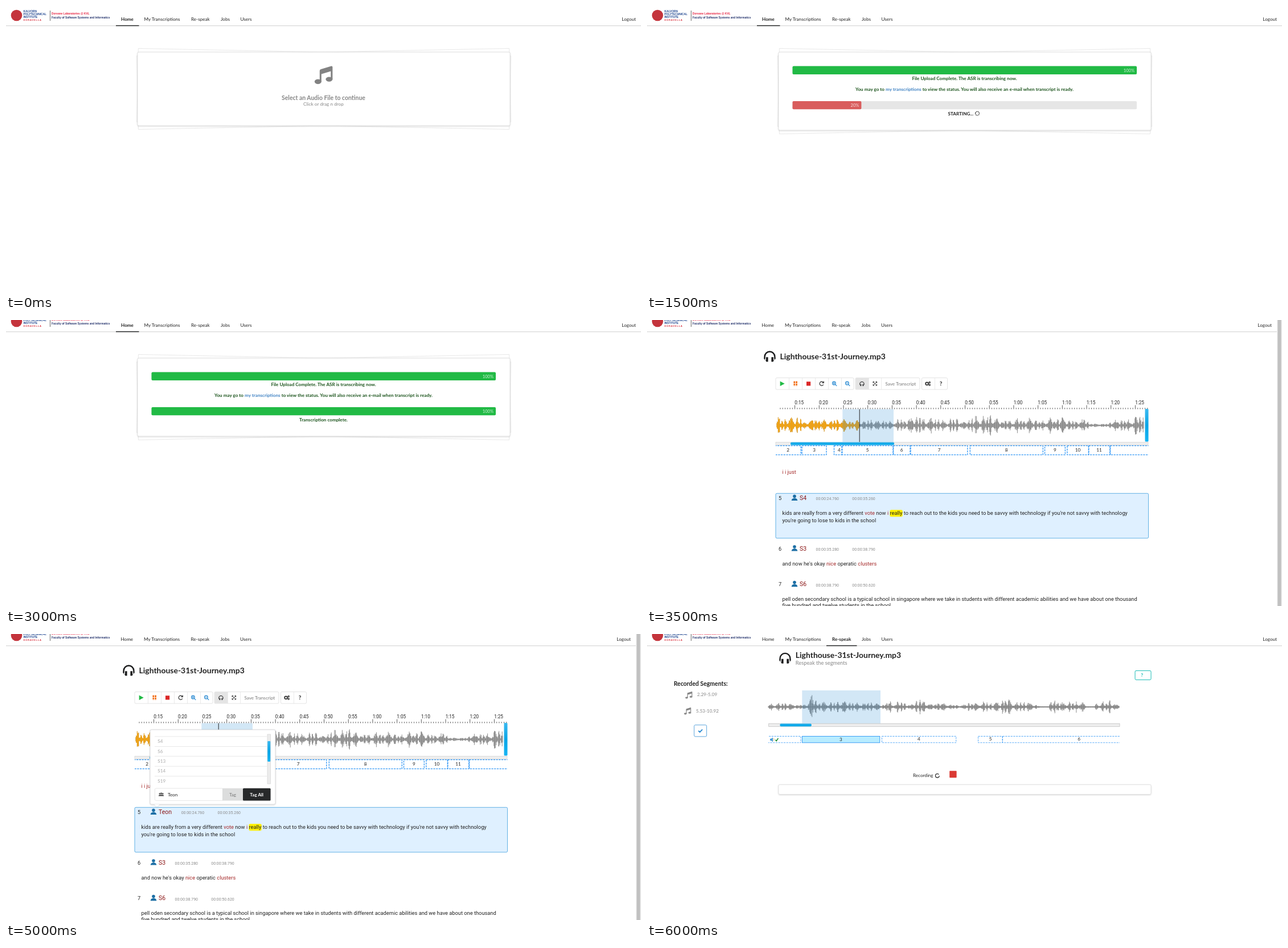
Recreate the animation shown at these times as an HTML page. Size 1115 px wide and 502 px high, loop 6500 ms.

```html
<!DOCTYPE html>
<html lang="en">
<head>
<meta charset="utf-8">
<title>Transcription demo</title>
<style>
html, body { margin: 0; width: 100%; height: 100%; overflow: hidden; background: #fff; }
svg.stage { display: block; width: 100vw; height: 100vh; }
text { font: 8.13px Lato, sans-serif; fill: #222; white-space: pre; }
.b { font-weight: 700; }
.m { text-anchor: middle; }
.e { text-anchor: end; }
.h2 { font-size: 13.94px; font-weight: 700; }
.h3 { font-size: 10.45px; font-weight: 700; }
.big { font-size: 9.29px; }
.pct { font-size: 7.55px; fill: #fff; fill-opacity: .8; }
.ok { fill: #1a531b; font-weight: 700; }
.link { fill: #4183c4; }
.brand { font: 700 4.8px "Liberation Sans", Arial, sans-serif; fill: #22316b; }
.r { font-family: Roboto, sans-serif; }
.say { font: 9.29px Roboto, sans-serif; }
.who { font: 10.45px Roboto, sans-serif; fill: #8b1515; }
.time { font: 6.97px Roboto, sans-serif; fill: #8a8a8a; }
.low { fill: #a52a2a; }
.grey { fill: #868686; }
.pale { fill: #a9a9a9; }
.seg rect { fill: none; stroke: #2d95f5; stroke-dasharray: 3.2 1.5; }
.icon { fill: none; stroke: #333; stroke-width: 1.2; }
</style>
</head>
<body>
<svg class="stage" viewBox="0 0 1115 502" preserveAspectRatio="none">
  <defs>
    <filter id="soft" x="-5%" y="-20%" width="110%" height="150%">
      <feDropShadow dx="0" dy=".7" stdDeviation=".9" flood-opacity=".2"/>
    </filter>
    <linearGradient id="blue" x2="0" y2="1">
      <stop stop-color="#3bb9f0"/><stop offset=".5" stop-color="#0aa5e6"/><stop offset="1" stop-color="#16b4f3"/>
    </linearGradient>
    <g id="note">
      <path d="M9 8.5Q9 6.3 11 5.8L29.3.3Q31.6-.2 31.6 2V23.5H28.5V9.2L12 14.2V28H9Z"/>
      <ellipse cx="6" cy="27.6" rx="6" ry="4.2"/><ellipse cx="25.6" cy="23.4" rx="6" ry="4.2"/>
    </g>
    <g id="phones">
      <path d="M1.6 14.5V10.6A8.9 8.9 0 0 1 19.4 10.6V14.5" fill="none" stroke="#1b1c1d" stroke-width="2.4"/>
      <path d="M.4 12Q.4 16.5 4 17V11.5H7.6V19.5H4.5M20.6 12Q20.6 16.5 17 17V11.5H13.4V19.5H16.5" fill="#1b1c1d"/>
    </g>
    <g id="user" fill="#1d6fa5"><circle cy="-2.6" r="2.8"/><path d="M-5.3 5Q-5.3 1.2 0 .4Q5.3 1.2 5.3 5Z"/></g>
  </defs>
  <g id="drop"></g>
  <g id="progress"></g>
  <g id="editor"></g>
  <g id="respeak"></g>
  <g id="nav"></g>
</svg>
<script>
const $ = id => document.getElementById(id);
const text = (x, y, s, cls = '', extra = '') => `<text x="${x}" y="${y}" class="${cls}" ${extra}>${s}</text>`;
const rect = (x, y, x2, y2, fill, extra = '') =>
  `<rect x="${x}" y="${y}" width="${x2 - x}" height="${y2 - y}" fill="${fill}" ${extra}/>`;
const path = (d, extra = 'class="icon"') => `<path d="${d}" ${extra}/>`;
const use = (id, x, y, k = 1, extra = '') =>
  `<use href="#${id}" transform="translate(${x} ${y}) scale(${k})" ${extra}/>`;
const low = s => `<tspan class="low">${s}</tspan>`;
const title = 'Lighthouse-31st-Journey.mp3';
const speaker = 'Teon';

// Header
function nav(active, right) {
  const items = [['Home', 202, 193, 233.5], ['My Transcriptions', 242.5], ['Re-speak', 325, 315, 368.5],
    ['Jobs', 377, 0, 0], ['Users', 411.5, 0, 0]];
  return rect(0, 0, right + 9, 34.3, '#fff') + rect(0, 34.2, right + 9, 35.2, '#cfcfcf') +
    '<circle cx="18.5" cy="16.5" r="9.8" fill="#c4343c"/>' +
    text(30.5, 11.4, 'KALVORN', 'brand', 'style="fill:#1f4690"') +
    text(30.5, 16.3, 'POLYTECHNICAL', 'brand', 'style="fill:#1f4690"') +
    text(30.5, 21.2, 'INSTITUTE', 'brand', 'style="fill:#1f4690"') +
    text(30.5, 26.3, 'DORAVELLA', 'brand', 'style="fill:#d8303c;font-size:4.1px;letter-spacing:.8px"') +
    rect(77.2, 8, 78, 26, '#444') +
    text(80, 15.2, 'Dorvane Laboratories @ KVL', 'brand', 'style="fill:#e6213f"') +
    text(80, 22, 'Faculty of Software Systems and Informatics', 'brand') +
    items.map(([s, x, a, b]) => s === active
      ? text(x, 26, s, 'b') + rect(a, 33.8, b, 35.2, '#1b1c1d')
      : text(x - (active ? 0 : .5), 26, s)).join('') +
    text(right, 26, 'Logout', 'e');
}

// Card lying on two tilted sheets
function card(bottom) {
  const tilt = a => rect(231, 81, 885, bottom, '#fff',
    `stroke="#dedede" stroke-width=".7" transform="rotate(${a} 558 ${(81 + bottom) / 2})"`);
  return tilt(-1.15) + tilt(1.15) +
    rect(231, 81, 885, bottom, '#fff', 'rx="2.3" stroke="#d6d6d6" stroke-width=".7" filter="url(#soft)"');
}

function bar(y, pct, color) {
  const end = 255.5 + 604.5 * pct / 100;
  return rect(255.5, y, 860, y + 14.3, '#e6e6e6', 'rx="2"') + rect(255.5, y, end, y + 14.3, color, 'rx="2"') +
    text(end - 4, y + 9.9, pct + '%', 'pct e');
}

const spinner = (x, y, turn) =>
  `<circle cx="${x}" cy="${y}" r="3.4" class="icon" stroke-dasharray="1.9 .77" transform="rotate(${turn} ${x} ${y})"/>`;

function progress(step) {
  const turn = step * 65;
  let job;
  if (step < 4) job = bar(167, 20, '#d95c5c') + text(528.5, 191.5, 'STARTING...', 'b') + spinner(580, 188.6, turn);
  else if (step < 6) job = bar(167, 70, '#b4d95c') + text(526.5, 191.5, 'DECODING...', 'b') + spinner(581.5, 188.6, turn);
  else job = bar(167, 100, '#21ba45') + text(557.5, 191.5, 'Transcription complete.', 'ok m');
  return card(218) + bar(105.6, 100, '#21ba45') +
    text(557.5, 130, 'File Upload Complete. The ASR is transcribing now.', 'ok m') +
    text(557.5, 149.2, 'You may go to <tspan class="link">my transcriptions</tspan> to view the status. You will also receive an e-mail when transcript is ready.', 'ok m') +
    job;
}

// Seeded speech-like waveform; env holds x, height pairs
function wave(env, mid, seed) {
  const rnd = () => (seed = (seed * 16807) % 2147483647) / 2147483647;
  let d = '', k = 0;
  const last = env[env.length - 2];
  for (let x = env[0]; x < last; x += .8) {
    while (x > env[k + 2]) k += 2;
    const f = (x - env[k]) / (env[k + 2] - env[k]);
    const a = env[k + 1] + (env[k + 3] - env[k + 1]) * f;
    const syllable = .55 + .45 * Math.sin(x * .75 + 2 * Math.sin(x * .21));
    const h = 1 + a * syllable * (.3 + .8 * rnd());
    d += `M${x.toFixed(1)} ${(mid - h).toFixed(1)}V${(mid + h * (.8 + .3 * rnd())).toFixed(1)}`;
  }
  return d;
}

const boxes = (x, y, x2, h, list, width) =>
  `<svg class="seg" x="${x}" y="${y - 1}" width="${x2 - x}" height="${h + 2}" viewBox="${x} ${y - 1} ${x2 - x} ${h + 2}">` +
  list.map(([a, b]) => rect(a, y, b, y + h, 'none', `stroke-width="${width}"`)).join('') + '</svg>' +
  list.map(([, , c, s]) => s ? text(c, y + h / 2 + 2.2, s, 'm') : '').join('');

const region = (x, y, x2, y2) => rect(x, y, x2, y2, '#2185d0', 'fill-opacity=".2"');

function row(n, y, who, from, to, shift = 0) {
  return text(231, y, n, 'say') + use('user', 259, y - 4) + text(268, y, who, 'who') +
    text(296.5 + shift, y + .3, from, 'time') + text(360.3 + shift, y + .3, to, 'time');
}

function toolbar() {
  const frame = (x, x2) => rect(x, 101.5, x2, 122, '#fff', 'rx="2" stroke="#d9d9d9" stroke-width=".7"');
  const zoom = (x, plus) => `<circle cx="${x - .6}" cy="111" r="2.8" class="icon" style="stroke:#2185d0"/>` +
    path(`M${x + 1.6} 113.2l2.6 2.6M${x - 2} 111h2.8${plus ? `M${x - .6} 109.6v2.8` : ''}`, 'class="icon" style="stroke:#2185d0"');
  let s = frame(226, 363) + frame(366, 479) + frame(482.5, 527.5) + rect(366.3, 101.8, 389, 121.7, '#e4e4e4');
  for (const x of [249, 272, 295, 318, 341, 389, 411.5, 505]) s += rect(x, 101.5, x + .6, 122, '#ddd');
  s += path('M233.7 107.5L241.7 111.8L233.7 116Z', 'fill="#21ba45"') +
    path('M258.8 107.5V116.2M262.6 107.5V116.2', 'fill="none" stroke="#f2711c" stroke-width="2.7" stroke-dasharray="3.4 .8"') +
    rect(280, 108.2, 287.2, 115.4, '#db2828') +
    path('M309.3 109.3A3.5 3.5 0 1 0 309.8 113.3M310.3 107.5V110.4H307.4') +
    zoom(329, true) + zoom(352, false) + use('phones', 373, 107.7, .42) +
    path('M397 108.4l6.6 6.6M403.6 108.4l-6.6 6.6M397 110.6v-2.2h2.2M401.4 108.4h2.2v2.2M403.6 112.8v2.2h-2.2M399.2 115h-2.2v-2.2', 'class="icon" style="stroke-width:1"') +
    text(445.3, 114.7, 'Save Transcript', 'm', 'style="fill:#777"') +
    '<circle cx="491.6" cy="111.8" r="2.4" class="icon" style="stroke-width:1.8"/>' +
    '<circle cx="496.2" cy="109.6" r="1.2" class="icon"/><circle cx="496.2" cy="114" r="1.2" class="icon"/>' +
    text(516, 115.2, '?', 'b m', 'style="font-size:10px"');
  return s;
}

function timeline() {
  let d = '', s = '';
  for (let i = -6; i <= 145; i++) {
    const x = 259.6 + i * 4.27;
    d += `M${x.toFixed(1)} 156.5v${i % 10 ? -2.4 : -7}`;
  }
  for (let k = 0; k < 15; k++) {
    const sec = 15 + k * 5;
    s += text(267.2 + k * 42.7, 147.6, `${sec / 60 | 0}:${String(sec % 60).padStart(2, '0')}`, 'r m');
  }
  return s + path(d, 'class="icon" style="stroke-width:.8"');
}

const talk = wave([228, 18, 240, 13, 262, 12, 288, 8, 297, 14, 320, 6, 335, 13, 350, 8, 365, 5, 373, 11, 400, 7, 425, 7,
  434, 11, 455, 9, 470, 15, 490, 13, 520, 8, 545, 12, 555, 5, 570, 14, 590, 18, 605, 17, 618, 9, 640, 12, 675, 12,
  690, 6, 700, 12, 730, 14, 745, 8, 770, 11, 778, 2, 810, 2, 818, 10, 840, 8, 858, 17, 872, 15], 185, 77);
const clip = wave([213, 5, 240, 6, 262, 3, 280, 4, 284, 19, 293, 18, 302, 9, 330, 6, 345, 10, 365, 5, 375, 9, 400, 6,
  412, 2, 425, 11, 445, 8, 462, 2, 470, 9, 490, 13, 497, 3, 512, 8, 530, 5, 550, 2, 565, 6, 590, 8, 615, 6, 630, 14,
  645, 9, 670, 7, 690, 0, 706, 0, 710, 13, 726, 7, 752, 8, 767, 9, 771, 0, 786, 0, 790, 7, 815, 10, 822, 3, 829, 5], 128, 991);

function popup() {
  let s = `<g filter="url(#soft)">` + rect(253, 168, 473, 299, '#fff', 'rx="2.4" stroke="#d0d0d2" stroke-width=".8"') +
    path('M260.5 299L265 303.2L269.5 299Z', 'fill="#fff"') + '</g>';
  ['S4', 'S6', 'S13', 'S14', 'S19'].forEach((n, i) => {
    const y = 179.6 + i * 17.4;
    s += rect(261, y, 458, y + .7, '#dedede') + text(266.3, y + 11.6, n, 'pale');
  });
  return s + rect(459, 176, 464.4, 263, '#ececec', 'stroke="#ccc" stroke-width=".6"') +
    rect(459.2, 188, 464.2, 224, 'url(#blue)', 'rx="1"') +
    rect(261.3, 271, 381, 292.3, '#fff', 'rx="2" stroke="#dcdcdc" stroke-width=".7"') +
    path('M267.8 284.5q0-2.5 2.1-2.5q2.4 0 2.6 0q.3 0 2.6 0q2.2 0 2.2 2.5Z', 'fill="#555"') +
    '<g fill="#555"><circle cx="269.9" cy="280.3" r="1.3"/><circle cx="272.6" cy="279.8" r="1.6"/><circle cx="275.3" cy="280.3" r="1.3"/></g>' +
    text(284, 284.6, speaker) +
    rect(380, 270.8, 416, 292.5, '#dcdddd') + text(398, 284.6, 'Tag', 'm', 'style="fill:#777"') +
    rect(416, 270.8, 464.6, 292.5, '#27292a', 'rx="1.5"') + text(440.2, 284.6, 'Tag All', 'b m', 'style="fill:#fff"');
}

function editor(step) {
  const named = step > 9;
  return use('phones', 205, 53.8) + text(233.5, 68.7, title, 'h2') + toolbar() + timeline() +
    path(talk, 'stroke="#808080" stroke-width=".9"') +
    `<svg x="226" y="157" width="147" height="57" viewBox="226 157 147 57">${path(talk, 'stroke="#ffa500" stroke-width=".9"')}</svg>` +
    region(343.3, 156.5, 433, 214) + rect(372.7, 156.5, 373.7, 214, '#222') +
    rect(874.5, 156, 880.5, 213.5, 'url(#blue)', 'rx="1.5"') +
    rect(226, 214.4, 880, 219.6, '#eee', 'stroke="#ccc" stroke-width=".6"') +
    rect(252, 214.6, 434, 219.4, 'url(#blue)', 'rx="2"') +
    boxes(226, 220.7, 880.5, 16, [[215, 270.3, 247.5, '2'], [272.2, 315, 293.5, '3'], [328.5, 342, 337.3, '4'],
      [342.8, 432, 387, '5'], [432.6, 462, 447, '6'], [463, 562.8, 513, '7'], [567.3, 695.3, 631, '8'],
      [698.5, 734.3, 716.3, '9'], [737.8, 775.3, 756.5, '10'], [775.8, 812.8, 794, '11'], [813.5, 890, 0, '']], 1.3) +
    text(237.5, 269.8, 'i i just', 'say low') +
    rect(226, 304.3, 880.5, 383, '#dff0ff', 'rx="2" stroke="#3d9fdf" stroke-width=".8"') +
    row(5, 316, named ? speaker : 'S4', '00:00:24.760', '00:00:35.260', named ? 11.2 : 0) +
    rect(426.4, 333.3, 448.8, 345.3, '#fff000', 'rx="2.5"') +
    text(237.5, 342.2, `kids are really from a very different ${low('vote')} now ${low('i')} really to reach out to the kids you need to be savvy with technology if you're not savvy with technology`, 'say') +
    text(237.5, 355, "you're going to lose to kids in the school", 'say') +
    row(6, 404.6, 'S3', '00:00:35.280', '00:00:38.790') +
    text(237.5, 430.6, `and now he's okay ${low('nice')} operatic ${low('clusters')}`, 'say') +
    row(7, 467.2, 'S6', '00:00:38.790', '00:00:50.620') +
    text(237.5, 493, 'pell oden secondary school is a typical school in singapore where we take in students with different academic abilities and we have about one thousand', 'say') +
    text(237.5, 503.7, 'five hundred and twelve students in the school', 'say') +
    rect(1106.3, 0, 1115, 502, '#f1f1f1') + rect(1107.3, 0, 1113.6, 502, '#c1c1c1') +
    (step === 9 || step === 10 ? popup() : '');
}

function respeak() {
  return use('phones', 232, 32.2) + text(260.8, 41.6, title, 'h2') + text(260.8, 54.3, 'Respeak the segments', 'big grey') +
    rect(857, 64.4, 885, 80.4, '#fff', 'rx="2" stroke="#00b5ad" stroke-width=".9"') + text(869, 75.4, '?', 'b m', 'style="fill:#00b5ad"') +
    text(47, 91.4, 'Recorded Segments:', 'h3') +
    use('note', 67.2, 101, .39, 'fill="#868686"') + text(88, 109.3, '2.29-5.09', 'grey') +
    use('note', 65, 129, .39, 'fill="#868686"') + text(86, 137.8, '5.53-10.92', 'grey') +
    rect(82.8, 159.7, 104.7, 180, '#fff', 'rx="2" stroke="#4a9bd8" stroke-width=".9"') +
    path('M90.3 169.8l2.5 2.4l4.5-4.7', 'class="icon" style="stroke:#2185d0;stroke-width:1.8"') +
    path(clip, 'stroke="#808080" stroke-width=".9"') + rect(213.5, 127.4, 829.5, 128.6, '#808080') +
    region(272.3, 99, 410, 157) +
    rect(213.7, 157.2, 830, 162.3, '#eee', 'stroke="#bbb" stroke-width=".7"') +
    rect(233.5, 157.2, 288.8, 162.3, 'url(#blue)', 'rx="2"') +
    rect(272.5, 179.5, 408.8, 190.8, '#b8ecff', 'stroke="#2d95f5" stroke-width=".9"') + text(340.3, 188, '3', 'm') +
    boxes(213, 179.5, 830, 11.3, [[200, 270, 0, ''], [412.5, 542.7, 477.3, '4'], [581.5, 624, 603, '5'], [624.5, 845, 758.5, '6']], .8) +
    path('M216 183.7h2l3-2.3v8l-3-2.3h-2Z', 'fill="#4a9bd8"') +
    path('M222.3 183q2 2.3 0 4.6', 'class="icon" style="stroke:#e0a93a;stroke-width:.8"') +
    path('M225.5 185.8l1.7 2l3.2-4.8', 'class="icon" style="stroke:#178a2c;stroke-width:1.5"') +
    text(467, 251.3, 'Recording') +
    '<circle cx="509.8" cy="248.7" r="3.3" class="icon" stroke-dasharray="18 2.7" style="stroke-width:1.3"/>' +
    rect(531.2, 240.2, 543.6, 252.3, '#db3a34', 'rx=".8"') +
    rect(231, 264.4, 885, 281.4, '#fff', 'rx="2.2" stroke="#d6d6d6" stroke-width=".7" filter="url(#soft)"');
}

const drop = card(210) + use('note', 541.8, 105.2, 1, 'fill="#828282"') +
  text(557.5, 164.5, 'Select an Audio File to continue', 'h3 grey m') +
  text(557.5, 175.2, 'Click or drag n drop', 'grey m', 'style="font-size:8.25px"');

let shown = -1;
function draw(step) {
  const inEditor = step > 6 && step < 12;
  const scroll = step < 4 ? 0 : step === 4 ? -14.5 : -14;
  $('drop').innerHTML = step < 2 ? drop : '';
  $('progress').innerHTML = step > 1 && step < 7 ? progress(step) : '';
  $('editor').innerHTML = inEditor ? editor(step) : '';
  $('respeak').innerHTML = step === 12 ? respeak() : '';
  $('nav').innerHTML = inEditor ? nav('', 1097) : nav(step === 12 ? 'Re-speak' : 'Home', 1106);
  for (const id of ['nav', 'progress']) $(id).setAttribute('transform', `translate(0 ${scroll})`);
}

function tick() {
  const step = Math.floor(performance.now() % 6500 / 500);
  if (step !== shown) draw(shown = step);
  requestAnimationFrame(tick);
}
tick();
</script>
</body>
</html>
```
